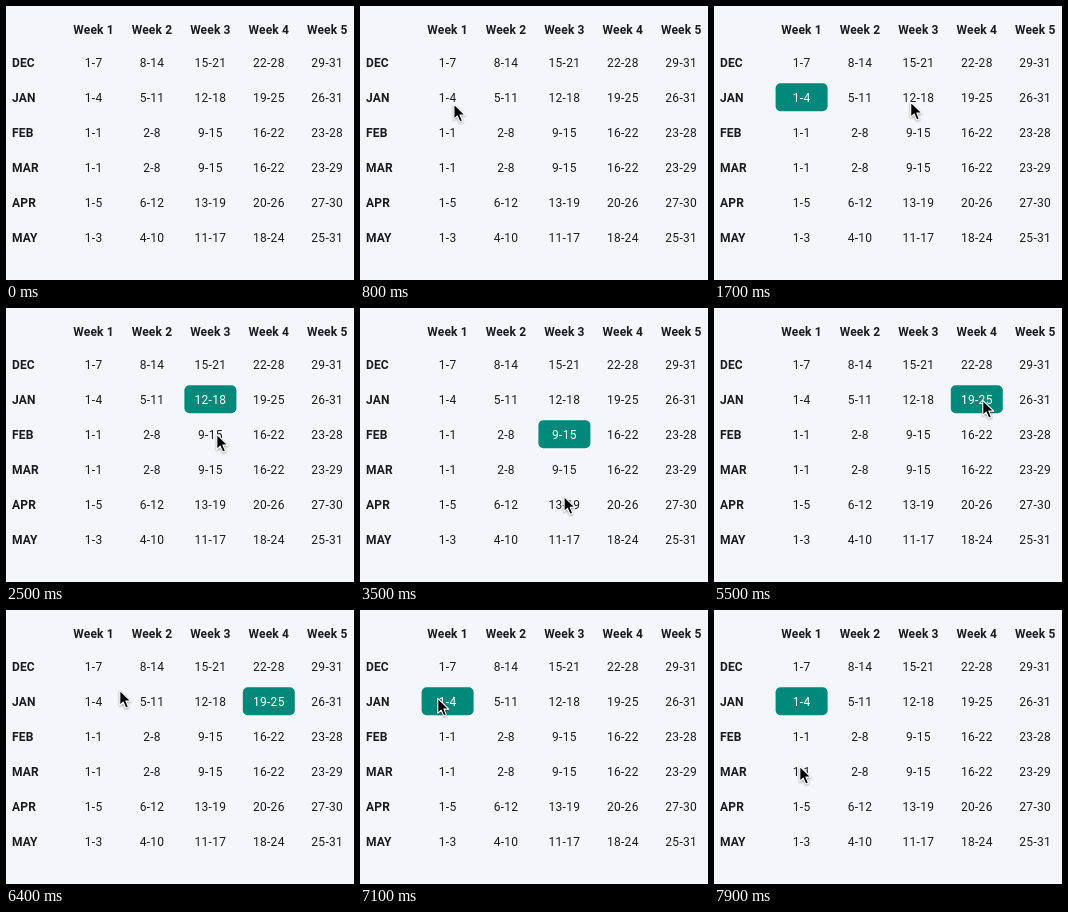
An HTML page that plays this animation: 348 px wide and 274 px high, repeating every 8000 ms.

```html
<!DOCTYPE html>
<html lang="en">
<head>
<meta charset="utf-8">
<title>Week picker</title>
<style>
  html, body { margin: 0; width: 100%; height: 100%; overflow: hidden; background: #f4f6fa; }
  svg { display: block; width: 348px; height: 274px; }
  text { font: 12px Roboto, sans-serif; letter-spacing: .3px; fill: #1b1c20; }
  .head { font-weight: 700; letter-spacing: .15px; }
  .mid { text-anchor: middle; }
  .picked { fill: #fff; }
  #cursor { filter: drop-shadow(0 1px 1px rgba(0, 0, 0, .35)); }
</style>
</head>
<body>
<svg id="stage" viewBox="0 0 348 274">
  <rect id="pill" width="52" height="28" rx="5" fill="#00897b"/>
  <g id="table"></g>
  <path id="cursor" d="M.8 1.3V16.3L4.2 13.1L6.8 19.1L9.4 17.9L6.9 12.1H11.8Z" stroke="#fff" stroke-width="1.1" stroke-linejoin="round"/>
</svg>
<script>
const LOOP = 8000, STEP = 100, CLICK_REST = 300;

// Cursor moves: departure, arrival, x, y
const moves = [
  [100, 900, 92, 94],
  [1500, 1800, 212, 95],
  [2300, 2500, 210, 125],
  [2800, 3900, 202, 199],
  [4200, 4400, 285, 195],
  [4700, 5300, 268, 91],
  [5600, 6200, 113, 79],
  [6400, 6700, 77, 87],
  [7200, 7900, 85, 155]
];
const entry = [150, 243];

const $ = id => document.getElementById(id);
const colX = c => 87.6 + c * 58.4;
const rowY = r => 61 + r * 35;

function addText(x, y, label, className) {
  const el = document.createElementNS('http://www.w3.org/2000/svg', 'text');
  el.setAttribute('x', x);
  el.setAttribute('y', y);
  el.setAttribute('class', className);
  el.textContent = label;
  return $('table').appendChild(el);
}

for (let c = 0; c < 5; c++) addText(colX(c), 28, `Week ${c + 1}`, 'head mid');

// Calendar weeks start on Sunday; the first one may be short
const cells = ['DEC', 'JAN', 'FEB', 'MAR', 'APR', 'MAY'].map((name, r) => {
  addText(6, rowY(r), name, 'head');
  const firstSaturday = 7 - new Date(2024, 11 + r, 1).getDay();
  const days = new Date(2024, 12 + r, 0).getDate();
  return Array.from({ length: 5 }, (_, c) => {
    const last = firstSaturday + 7 * c;
    return addText(colX(c), rowY(r), `${Math.max(1, last - 6)}-${Math.min(days, last)}`, 'mid');
  });
});

// A long enough stop ends in a click on the nearest cell, just before departure
const picks = moves.slice(1).flatMap(([depart], i) => {
  const [, arrive, x, y] = moves[i];
  if (depart - arrive < CLICK_REST) return [];
  return [{
    time: depart - STEP,
    row: Math.round((y - rowY(0) + 4) / 35),
    col: Math.round((x - colX(0)) / 58.4)
  }];
});

function cursorAt(t) {
  const i = moves.findLastIndex(m => m[0] <= t);
  const [depart, arrive, x, y] = moves[i];
  const [x0, y0] = i ? moves[i - 1].slice(2) : entry;
  const k = Math.sin(Math.min(1, (t - depart) / (arrive - depart)) * Math.PI / 2);
  return [x0 + (x - x0) * k, y0 + (y - y0) * k];
}

function draw(now) {
  const t = Math.floor(now % LOOP / STEP) * STEP;
  const pick = picks.findLast(p => p.time <= t);
  cells.flat().forEach(el => el.classList.remove('picked'));
  $('pill').style.display = pick ? '' : 'none';
  if (pick) {
    cells[pick.row][pick.col].classList.add('picked');
    $('pill').setAttribute('x', colX(pick.col) - 26);
    $('pill').setAttribute('y', rowY(pick.row) - 18.8);
  }
  const shown = t >= moves[0][0];
  $('cursor').style.display = shown ? '' : 'none';
  if (shown) $('cursor').setAttribute('transform', `translate(${cursorAt(t)})`);
}

const start = performance.now();
function tick() {
  draw(performance.now() - start);
  requestAnimationFrame(tick);
}
tick();
</script>
</body>
</html>
```
